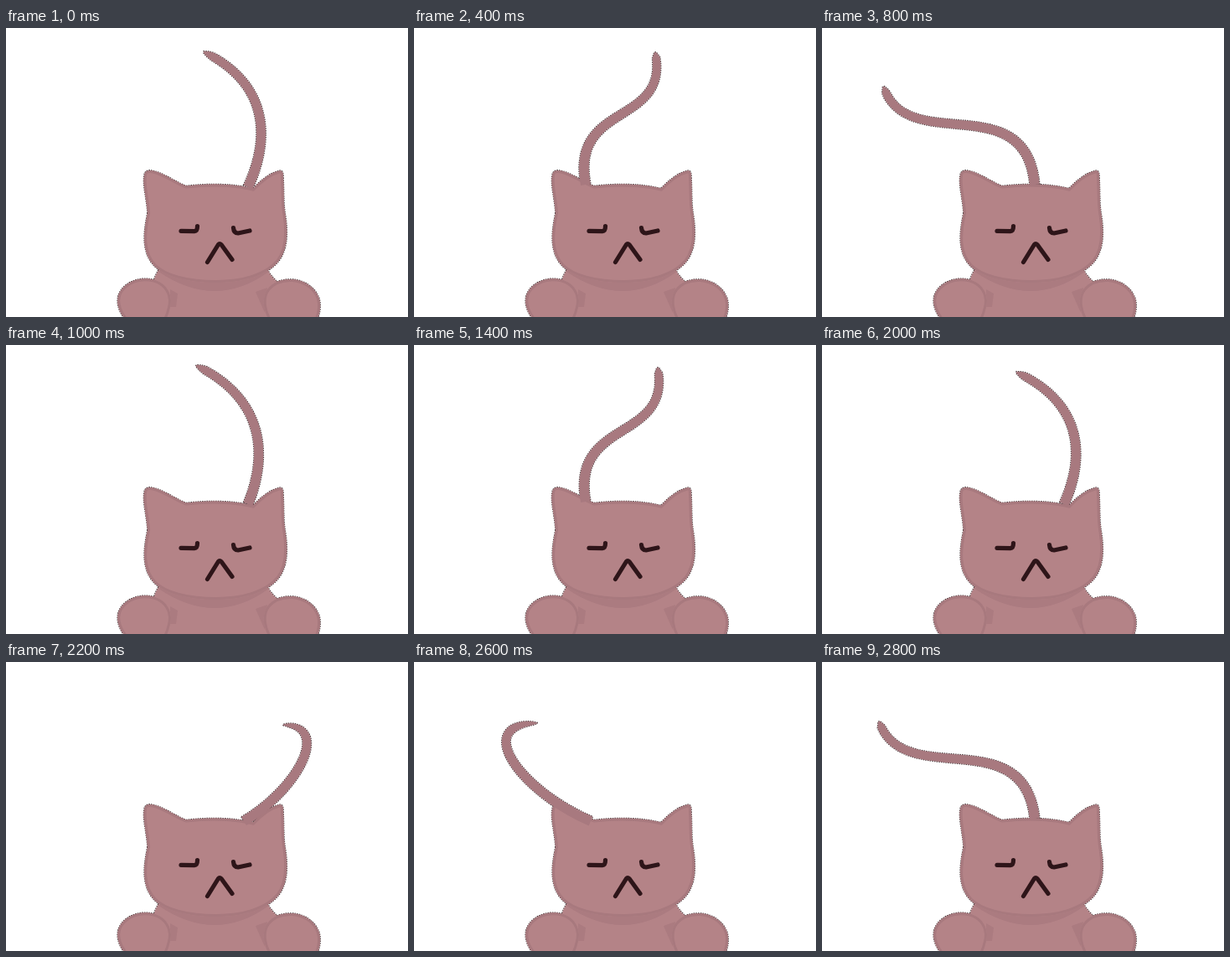
Write an HTML page that moves like this. It is 480 by 345 pixels and loops after 3 s.

```html
<!DOCTYPE html>
<html lang="en">
<head>
<meta charset="utf-8">
<title>Grumpy cat</title>
<style>
  html, body { margin: 0; width: 100%; height: 100%; overflow: hidden; background: #fff; }
  svg { display: block; width: 100vw; height: 100vh; }
  .fur { fill: #b48387; }
  .shade { fill: #ab7b80; }
  .rim { fill: none; stroke: #a8797e; stroke-width: 6; }
  .edge { fill: none; stroke: #3f2c2f; stroke-width: 1.6; stroke-dasharray: 1.5 1.2; }
  .face { fill: none; stroke: #2e1519; stroke-width: 5.2; stroke-linecap: round; stroke-linejoin: round; }
</style>
</head>
<body>
<svg viewBox="0 0 480 345">
  <defs>
    <path id="head" d="M169 221C168 204 163 188 165 176Q166 168 176 170.500C190 174 201 183 215 188.500Q250 184.500 279 188.500Q289 190 295 191.500C304 182 315 173 326 170.500Q331 169 331 177C332 195 331 209 333.500 223C337 246 336 265 325 279C311 296 282 304 251 304C217 304 190 297 177 284C163 269 163 248 169 221Z"/>
    <path id="body" d="M182 289Q178 295 176 303L165 356H345L323 302Q318 298 313 290Z"/>
    <path id="pawL" d="M150 356C131 339 130 322 138 312C146 302 159 298 171 299.500C186 301 196 311 197 325Q197 338 187 356Z"/>
    <path id="pawR" d="M319 356C306 340 305 322 312 312C319 303 329 299.500 342 300C356 301 369 309 374 323Q378 338 368 356Z"/>
    <path id="tail"/>
    <clipPath id="inHead"><use href="#head"/></clipPath>
    <clipPath id="inPawL"><use href="#pawL"/></clipPath>
    <clipPath id="inPawR"><use href="#pawR"/></clipPath>
  </defs>

  <!-- Outlines lie behind, so only the silhouette shows -->
  <g class="edge">
    <use href="#tail"/><use href="#head"/><use href="#body"/><use href="#pawL"/><use href="#pawR"/>
  </g>

  <use href="#body" class="fur"/>
  <path class="shade" d="M181 290Q250 338 315 290Z"/>
  <path class="shade" d="M196 312L205 317L203 333H196ZM312 310L298 315L309 340Z"/>

  <use href="#pawL" class="fur"/>
  <use href="#pawL" class="rim" clip-path="url(#inPawL)"/>
  <use href="#pawR" class="fur"/>
  <use href="#pawR" class="rim" clip-path="url(#inPawR)"/>
  <use href="#head" class="fur"/>
  <use href="#head" class="rim" clip-path="url(#inHead)"/>

  <g class="face">
    <path d="M209 242.300L225 242.700Q228.500 242.500 228.500 236.500"/>
    <path d="M271.500 238.500Q272 245 277 245L291 242"/>
    <path d="M240.500 279.500L253.500 258.500Q255 256.500 257 258.500L270 276.500"/>
  </g>
  <use href="#tail" fill="#a8797f"/>
</svg>
<script>
const STEP = 200, SAMPLES = 40;

// One wag: a Bezier curve from base to tip, the length of the pointed end,
// and how far the tip strays in each of the three wags.
const wag = [
  { curve: [[289, 190], [320, 122], [306, 62], [236, 28.5]], point: 13, stray: [[0, 0], [-9, -4], [-4, 4]] },
  { curve: [[284, 190], [348, 152], [390, 76], [331, 75]], point: 32, stray: [[16, -2], [6, 0], [0, 0]] },
  { curve: [[205, 187], [186, 87], [306, 118], [288, 29]], point: 8, stray: [[0, 0], [3, -2], [-4, 10]] },
  { curve: [[211, 190], [127, 152], [70, 71], [149, 69]], point: 32, stray: [[0, 0], [-5, 2], [-2, 4]] },
  { curve: [[254, 187], [243, 69], [101, 154], [73.5, 70]], point: 8, stray: [[0, 0], [10, -2], [-5.5, 1]] }
];

const mix = (a, b, t) => a.map((v, i) => v + (b[i] - v) * t);

// Point and direction on a curve by repeated interpolation.
function along(curve, t) {
  let pts = curve;
  while (pts.length > 2) pts = pts.slice(1).map((p, i) => mix(pts[i], p, t));
  const [a, b] = pts, dx = b[0] - a[0], dy = b[1] - a[1];
  const len = Math.hypot(dx, dy);
  return { at: mix(a, b, t), dir: [dx / len, dy / len] };
}

function tailPath({ curve, point, stray }, round) {
  const [sx, sy] = stray[round];
  const bent = curve.map(([x, y], i) => [x + sx * i / 3, y + sy * i / 3]);
  const tip = bent[3], left = [], right = [];
  for (let i = 0; i <= SAMPLES; i++) {
    const t = i / SAMPLES;
    const { at: [x, y], dir: [dx, dy] } = along(bent, t);
    const rest = Math.hypot(tip[0] - x, tip[1] - y);
    const r = (5.9 - 1.1 * t) * Math.sqrt(Math.min(1, (rest + .4) / point));
    left.push([x + dy * r, y - dx * r]);
    right.unshift([x - dy * r, y + dx * r]);
  }
  return "M" + [...left, ...right].map(p => p.map(v => v.toFixed(1)).join(" ")).join("L") + "Z";
}

const tail = document.getElementById("tail");

function draw(ms) {
  const step = Math.floor(ms / STEP);
  const round = Math.floor(step / wag.length) % 3;
  tail.setAttribute("d", tailPath(wag[step % wag.length], round));
}

const start = performance.now();
function tick() {
  draw(performance.now() - start);
  requestAnimationFrame(tick);
}
tick();
</script>
</body>
</html>
```
